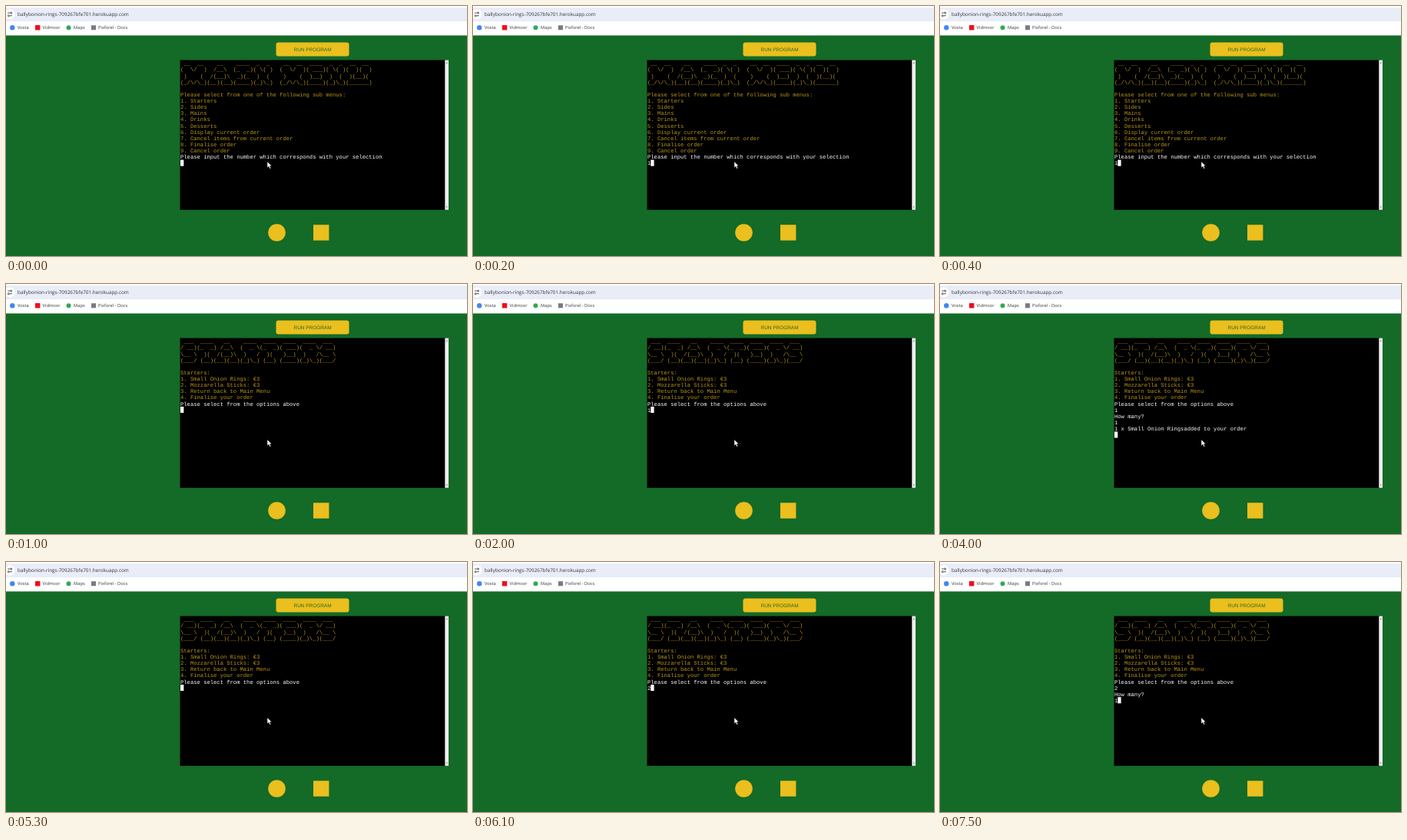
An HTML page for the animation above (8000 ms loop, 600x326 px).

```html
<!DOCTYPE html>
<html lang="en">
<head>
<meta charset="utf-8">
<title>Order terminal</title>
<style>
  html, body { margin: 0; width: 100%; height: 100%; overflow: hidden; background: #146a27; }
  svg { display: block; width: 600px; height: 326px; }
  text { white-space: pre; text-rendering: geometricPrecision; }
  .bar { font: 5.75px "Open Sans", sans-serif; fill: #33363b; }
  .url { font-size: 6.38px; }
  .run { font: 6.45px "Liberation Sans", Arial, sans-serif; fill: #2c6a26; text-anchor: middle; }
  #screen { font: 7.18px "Liberation Mono", "Courier New", monospace; fill: #fff; }
  #screen .gold { fill: #bd961a; }
</style>
</head>
<body>
<svg viewBox="0 0 600 326">
  <!-- browser bar -->
  <rect width="600" height="39" fill="#fff"/>
  <rect y="2" width="600" height="18" fill="#e9edf7"/>
  <circle cx="5" cy="10.8" r="6.6" fill="#fff"/>
  <g fill="none" stroke="#3c4043" stroke-width="1">
    <path d="M2.3 9h2.4M5.2 12.7h2.6"/>
    <circle cx="6.6" cy="9" r="1"/>
    <circle cx="3.4" cy="12.7" r="1"/>
  </g>
  <text class="bar url" x="15" y="13">ballybonion-rings-709267bfe701.herokuapp.com</text>
  <circle cx="8.3" cy="28.2" r="3.2" fill="#4285f4"/>
  <text class="bar" x="15" y="30.2">Vosta</text>
  <rect x="38" y="25" width="6.4" height="6.4" fill="#f00d1a"/>
  <text class="bar" x="47.5" y="30.2">Vidmoor</text>
  <circle cx="81.5" cy="28.2" r="3" fill="#34a853"/>
  <text class="bar" x="88" y="30.2">Maps</text>
  <rect x="111" y="25.2" width="6" height="6" fill="#777b84"/>
  <text class="bar" x="120" y="30.2">Pixforel - Docs</text>

  <!-- page -->
  <rect y="38.4" width="600" height="287.6" fill="#146a27"/>
  <rect x="351.5" y="47.5" width="95" height="18" rx="3" fill="#eabf1e"/>
  <text class="run" x="399" y="58.9">RUN PROGRAM</text>
  <rect x="226.5" y="70.5" width="349.5" height="195.3"/>
  <rect x="571.3" y="70.5" width="4.7" height="195.3" fill="#efefef"/>
  <path d="M572.6 75l1.1-1.6 1.1 1.6zM572.6 261.4l1.1 1.6 1.1-1.6z" fill="#666"/>
  <circle cx="352.5" cy="295.5" r="11.3" fill="#eabf1e"/>
  <rect x="400" y="285.3" width="20.4" height="20.4" fill="#eabf1e"/>

  <g id="screen"></g>
  <path d="M340 202.8v8.2l1.9-1.7 1.4 3 1.5-.7-1.4-2.9h2.6z" fill="#fff" stroke="#000" stroke-width=".5"/>
</svg>
<script>
const LOOP = 8000, LEFT = 227, TOP = 70.5, ROW = 8.13, COL = 4.309, BASELINE = 6.8;
const screen = document.getElementById("screen");

const mainMenu = String.raw`
 __  __    __    ____  _  _    __  __  ____  _  _  __  __
(  \/  )  /__\  (_  _)( \( )  (  \/  )( ___)( \( )(  )(  )
 )    (  /(__)\  _)(_  )  (    )    (  )__)  )  (  )(__)(
(_/\/\_)(__)(__)(____)(_)\_)  (_/\/\_)(____)(_)\_)(______)

Please select from one of the following sub menus:
1. Starters
2. Sides
3. Mains
4. Drinks
5. Desserts
6. Display current order
7. Cancel items from current order
8. Finalise order
9. Cancel order`.slice(1).split("\n");

const starters = String.raw`
 ___  ____   __    ____  ____  ____  ____  ___
/ __)(_  _) /__\  (  _ \(_  _)( ___)(  _ \/ __)
\__ \  )(  /(__)\  )   /  )(   )__)  )   /\__ \
(___/ (__)(__)(__)(_)\_) (__) (____)(_)\_)(___/

Starters:
1. Small Onion Rings: €3
2. Mozzarella Sticks: €3
3. Return back to Main Menu
4. Finalise your order`.slice(1).split("\n");

const pick = "Please input the number which corresponds with your selection";
const choose = "Please select from the options above";
const ask = "How many?";

// start time, gold lines, white lines (the block cursor ends the last one)
const steps = [
  [0, mainMenu, [pick, ""]],
  [200, mainMenu, [pick, "1"]],
  [1000, starters, [choose, ""]],
  [1900, starters, [choose, "1"]],
  [2400, starters, [choose, "1", ask, ""]],
  [2900, starters, [choose, "1", ask, "1"]],
  [3300, starters, [choose, "1", ask, "1", "1 x Small Onion Ringsadded to your order", ""]],
  [5300, starters, [choose, ""]],
  [6000, starters, [choose, "2"]],
  [6700, starters, [choose, "2", ask, ""]],
  [7500, starters, [choose, "2", ask, "1"]]
];

function add(tag, attrs, text = "") {
  const node = document.createElementNS("http://www.w3.org/2000/svg", tag);
  for (const key in attrs) node.setAttribute(key, attrs[key]);
  node.textContent = text;
  screen.append(node);
}

function draw([, gold, white]) {
  screen.replaceChildren();
  [...gold, ...white].forEach((line, i) => add("text", {
    x: LEFT, y: TOP + i * ROW + BASELINE, class: i < gold.length ? "gold" : "white"
  }, line));
  add("rect", {
    x: LEFT + white.at(-1).length * COL,
    y: TOP + (gold.length + white.length - 1) * ROW,
    width: COL, height: ROW
  });
}

let shown;
function tick() {
  const t = performance.now() % LOOP;
  const step = steps.findLast(s => s[0] <= t);
  if (step !== shown) draw(shown = step);
  requestAnimationFrame(tick);
}
tick();
</script>
</body>
</html>
```
